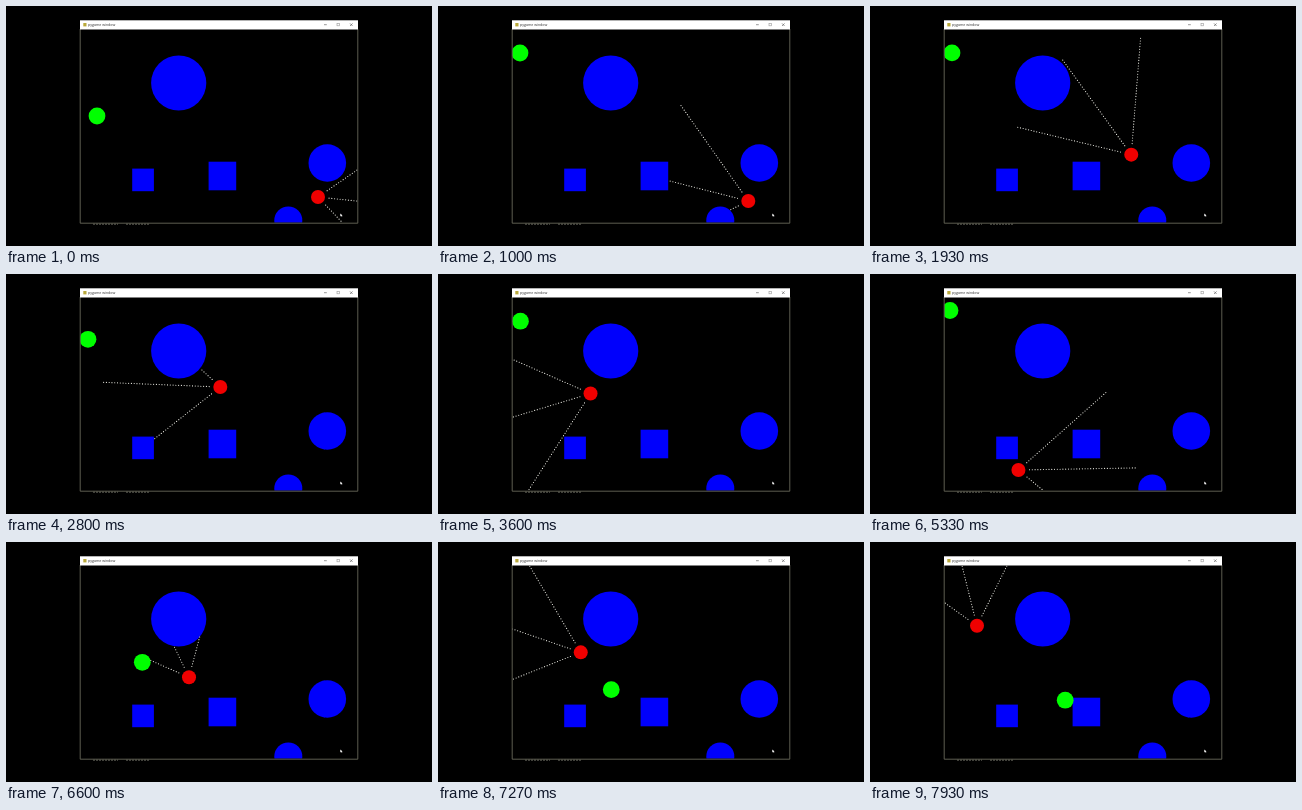
Recreate the animation shown at these times as an HTML page. Size 426x240 px, loop 8000 ms.

```html
<!DOCTYPE html>
<html lang="en">
<head>
<meta charset="utf-8">
<title>pygame window</title>
<style>
  html, body { margin: 0; width: 100%; height: 100%; overflow: hidden; background: #000; }
  svg { display: block; width: 100vw; height: 100vh; }
  text { font-family: "Open Sans", "Noto Sans", sans-serif; }
</style>
</head>
<body>
<svg viewBox="0 0 426 240">
  <defs>
    <clipPath id="field"><rect x="74.3" y="23.5" width="277.4" height="193"/></clipPath>
  </defs>
  <rect width="426" height="240" fill="#000"/>

  <g clip-path="url(#field)">
    <g id="obstacles" fill="#0000fc"></g>
    <circle id="target" r="8.4" fill="#00ff00"/>
    <path id="rays" fill="none" stroke="#f0f0e8" stroke-width="1.15"
          stroke-linecap="round" stroke-dasharray="0 2.78"/>
    <circle id="agent" r="7" fill="#f00000"/>
  </g>

  <path d="M74.2 23V217.2H351.8V23" fill="none" stroke="#68685a" stroke-width=".9"/>
  <path d="M87 218.2h25M120 218.2h24" stroke="#77776a" stroke-width=".8" stroke-dasharray="2 1"/>
  <rect x="74" y="14.3" width="278" height="9.2" fill="#fff"/>
  <rect x="77.3" y="17" width="3.2" height="3.4" fill="#b9a93c"/>
  <text x="82" y="20" font-size="3.6" fill="#333">pygame window</text>
  <g fill="none" stroke="#555" stroke-width=".6">
    <path d="M318 18.7h2.8M344 17.4l2.6 2.6m0-2.6l-2.6 2.6"/>
    <rect x="331" y="17.4" width="2.4" height="2.4" stroke="#999"/>
  </g>
  <path d="M334.3 207.6v2.8l.8-.6.7 1 .5-.4-.5-.9h.8z" fill="#fff"/>
</svg>

<script>
const $ = id => document.getElementById(id);
const LOOP = 8000, FPS = 15;
const SPEED = 70, SPREAD = 40.5, STEP = 2.78, REACH = 117.5;
const wall = { l: 74.3, r: 351.7, t: 23.5, b: 216.5 };

const circles = [[172.7, 77, 27.6], [321.3, 157, 18.8], [282.3, 214.5, 14]];
const boxes = [[126.2, 162.6, 21.7, 22.6], [202.6, 155.7, 27.6, 28.6]];

$('obstacles').innerHTML =
  circles.map(([x, y, r]) => `<circle cx="${x}" cy="${y}" r="${r}"/>`).join('') +
  boxes.map(([x, y, w, h]) => `<rect x="${x}" y="${y}" width="${w}" height="${h}"/>`).join('');

const rad = deg => deg * Math.PI / 180;

// Keys are [time, x, y, vx, vy]
const heading = ([t, x, y, deg]) =>
  [t, x, y, SPEED * Math.cos(rad(deg)), SPEED * Math.sin(rad(deg))];

// The repeated time is the bounce off the right wall
const agentKeys = [
  [0, 312, 191, 5.9], [.47, 344, 194.3, 5.9],
  [.47, 344, 194.3, 174], [1, 310.3, 195, 194.3],
  [2.8, 214.3, 113, 182.3], [4.333, 112, 150.3, 113.3],
  [5.333, 148.4, 196, -1], [6.6, 183, 135.3, 244.3], [7.933, 107, 83.8, 256]
].map(heading);

const targetKeys = [
  [0, 91, 110, -25, -65], [1, 82, 47, 0, -45], [2.8, 82, 65.3, 0, 0],
  [4.333, 82.8, 31.3, 0, 0], [5.333, 80, 36.5, 15, 30],
  [6.6, 136.3, 120.3, 50, 50], [7.933, 195.2, 158.2, 5, 0]
];

// Cubic Hermite position and direction
function follow(keys, t) {
  let i = 0;
  while (i < keys.length - 2 && t >= keys[i + 1][0]) i++;
  const a = keys[i], b = keys[i + 1], d = b[0] - a[0];
  const u = Math.min(1, (t - a[0]) / d), u2 = u * u, u3 = u2 * u;
  const pos = k => (2 * u3 - 3 * u2 + 1) * a[k] + (3 * u2 - 2 * u3) * b[k] +
    d * ((u3 - 2 * u2 + u) * a[k + 2] + (u3 - u2) * b[k + 2]);
  const vel = k => 6 * (u - u2) * (b[k] - a[k]) / d +
    (3 * u2 - 4 * u + 1) * a[k + 2] + (3 * u2 - 2 * u) * b[k + 2];
  return { x: pos(1), y: pos(2), dir: Math.atan2(vel(2), vel(1)) };
}

function blocked(x, y, target) {
  return x < wall.l || x > wall.r || y < wall.t || y > wall.b ||
    [...circles, [target.x, target.y, 8.4]].some(([cx, cy, r]) => Math.hypot(x - cx, y - cy) < r) ||
    boxes.some(([bx, by, w, h]) => x > bx && x < bx + w && y > by && y < by + h);
}

function ray(from, angle, target) {
  const c = Math.cos(angle), s = Math.sin(angle), start = 4 * STEP;
  let d = start;
  while (d <= REACH && !blocked(from.x + d * c, from.y + d * s, target)) d += STEP;
  if (d === start) return '';
  d -= STEP * .9;
  return `M${from.x + start * c} ${from.y + start * s}L${from.x + d * c} ${from.y + d * s}`;
}

function place(id, p) {
  $(id).setAttribute('cx', p.x);
  $(id).setAttribute('cy', p.y);
}

function render(ms) {
  // Hold each step on a 10 ms clock
  const t = Math.floor((Math.floor(ms / 10) * 10 + 4) * FPS / 1000) / FPS;
  const agent = follow(agentKeys, t), target = follow(targetKeys, t);
  place('agent', agent);
  place('target', target);
  $('rays').setAttribute('d', [-SPREAD, 0, SPREAD]
    .map(a => ray(agent, agent.dir + rad(a), target)).join(''));
}

const begin = performance.now();
function tick() {
  render((performance.now() - begin) % LOOP);
  requestAnimationFrame(tick);
}
tick();
</script>
</body>
</html>
```
